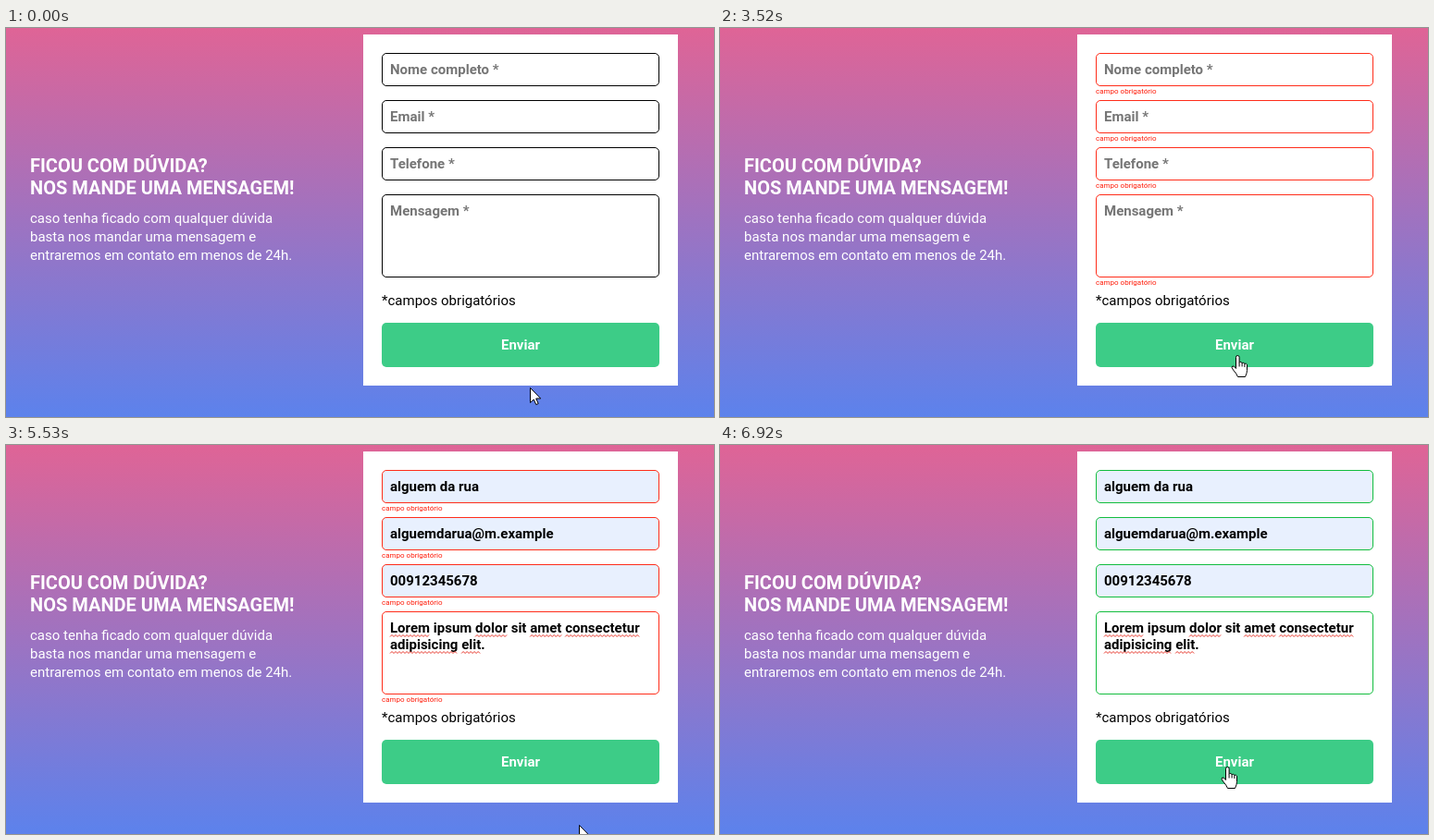
An HTML page for the animation above (8000 ms loop, 765 by 421 pixels).

```html
<!DOCTYPE html>
<html lang="pt-BR">
<head>
<meta charset="utf-8">
<title>Formulário de contato</title>
<style>
  * { box-sizing: border-box; margin: 0; padding: 0; }
  html, body { width: 100%; height: 100%; overflow: hidden; }
  body {
    position: relative;
    font: 15px/20px Roboto, Arial, sans-serif;
    color: #fff;
    background: linear-gradient(#df6496, #5c82ec);
  }
  .info { position: absolute; left: 26px; top: 137px; white-space: nowrap; }
  h1 { font-size: 20px; line-height: 24px; font-weight: 700; margin-bottom: 11px; }
  .card { position: absolute; left: 386px; top: 7px; width: 340px; height: 380px; background: #fff; }
  .field {
    position: absolute; left: 20px; width: 300px; height: 36px;
    padding: 8px; border: 1px solid #000; border-radius: 5px;
    font-weight: 700; line-height: 18px; color: #757575; white-space: nowrap;
  }
  .area { height: 90px; }
  .value { display: none; }
  .error {
    position: absolute; left: 20px; display: none;
    font-size: 8px; line-height: 9px; color: #ff1c0a;
  }
  .note { position: absolute; left: 20px; top: 278px; color: #000; }
  .send {
    position: absolute; left: 20px; top: 312px; width: 300px; height: 48px;
    border-radius: 5px; background: #3dcc87;
    font-weight: 700; line-height: 48px; text-align: center;
  }
  u { text-decoration: none; }
  .filled .hint { display: none; }
  .filled .value { display: inline; color: #000; }
  .filled .field:not(.area) { background: #e8f0fe; }
  .invalid .field { border-color: #ff2d1a; }
  .invalid .error { display: block; }
  .valid .field { border-color: #12bd3e; }
  svg { position: absolute; left: 0; top: 0; width: 765px; height: 421px; overflow: hidden; }
  .wave { fill: none; stroke: #e8372c; stroke-width: 1; visibility: hidden; }
  .filled .wave { visibility: visible; }
  .cursor { fill: #fff; stroke: #000; stroke-width: 1; stroke-linejoin: round; }
</style>
</head>
<body>
<div class="info">
  <h1>FICOU COM DÚVIDA?<br>NOS MANDE UMA MENSAGEM!</h1>
  <p>caso tenha ficado com qualquer dúvida<br>basta nos mandar uma mensagem e<br>entraremos em contato em menos de 24h.</p>
</div>
<div class="card" id="card">
  <p class="note">*campos obrigatórios</p>
  <div class="send">Enviar</div>
</div>
<svg>
  <path id="wave" class="wave"/>
  <g id="arrow" class="cursor"><path d="M.5 .5V16.5L4.2 13L6.8 18.6L9.2 17.5L6.7 12H11.7Z"/></g>
  <g id="hand" class="cursor">
    <path d="M5.5 14.5V2.3a1.8 1.8 0 0 1 3.6 0V8.3a1.6 1.6 0 0 1 3 .6a1.6 1.6 0 0 1 2.8 .8a1.5 1.5 0 0 1 2.6 1.2V16.5q0 3-2 7H7.5q-1-3-5-7.5q-2.5-3-.8-4q1.8-.7 3.8 2.5Z"/>
    <path d="M9.1 8.3V12.5M12.1 8.9V12.5M14.9 9.7V13" fill="none"/>
  </g>
</svg>
<script>
const $ = id => document.getElementById(id);
const card = $('card');
const page = document.body;
const LOOP = 8000;

// top, placeholder, value
const fields = [
  [20, 'Nome completo', 'alguem da rua'],
  [71, 'Email', 'alguemdarua@m.example'],
  [122, 'Telefone', '00912345678'],
  [173, 'Mensagem', '<u>Lorem</u> ipsum <u>dolor</u> sit <u>amet</u> <u>consectetur</u><br><u>adipisicing</u> <u>elit</u>.']
];
card.insertAdjacentHTML('beforeend', fields.map(([top, hint, value], i) => {
  const area = i === 3;
  return `<div class="field${area ? ' area' : ''}" style="top:${top}px">
    <span class="hint">${hint} *</span><span class="value">${value}</span></div>
    <p class="error" style="top:${top + (area ? 91 : 37)}px">campo obrigatório</p>`;
}).join(''));

// Spelling squiggles under the marked words
page.className = 'filled';
let squiggle = '';
for (const word of card.querySelectorAll('u')) {
  const r = word.getBoundingClientRect();
  squiggle += `M${r.left} ${Math.round(r.bottom) + .5}`;
  for (let x = 0, up = true; x + 2 <= r.width; x += 2, up = !up) {
    squiggle += `l2 ${up ? -2 : 2}`;
  }
}
$('wave').setAttribute('d', squiggle);

const states = [
  [0, ''],
  [1680, 'invalid'],
  [4460, 'invalid filled'],
  [6830, 'valid filled']
];

// time, shape, tip x, tip y
const moves = [
  [0, 'arrow', 566, 389],
  [1200, 'arrow', 565, 386],
  [1270, 'arrow', 562, 376],
  [1340, 'hand', 560, 364],
  [1410, 'hand', 558, 357],
  [1480, 'hand', 557, 353],
  [3520, 'hand', 559, 354],
  [3590, 'hand', 565, 359],
  [3660, 'arrow', 580, 374],
  [3730, 'arrow', 616, 407],
  [3800, ''],
  [5460, 'arrow', 624, 416],
  [5530, 'arrow', 619, 411],
  [5600, 'arrow', 611, 406],
  [5670, 'arrow', 601, 400],
  [5740, 'arrow', 592, 395],
  [5810, 'arrow', 583, 390],
  [5880, 'arrow', 575, 386],
  [5940, 'arrow', 569, 384],
  [6010, 'arrow', 558, 377],
  [6090, 'arrow', 547, 370],
  [6160, 'arrow', 544, 368],
  [6230, 'arrow', 549, 371],
  [6300, 'hand', 549, 364],
  [6370, 'hand', 548, 357],
  [6440, 'hand', 547, 351],
  [6560, 'hand', 548, 348]
];

const at = (table, t) => table.findLast(row => row[0] <= t);

function draw(t) {
  page.className = at(states, t)[1];
  const [, shape, x, y] = at(moves, t);
  for (const id of ['arrow', 'hand']) {
    const el = $(id);
    el.style.display = id === shape ? '' : 'none';
    if (id === shape) el.setAttribute('transform', `translate(${id === 'hand' ? x - 7 : x} ${y})`);
  }
}

const start = performance.now();
function tick() {
  draw((performance.now() - start) % LOOP);
  requestAnimationFrame(tick);
}
tick();
</script>
</body>
</html>
```
